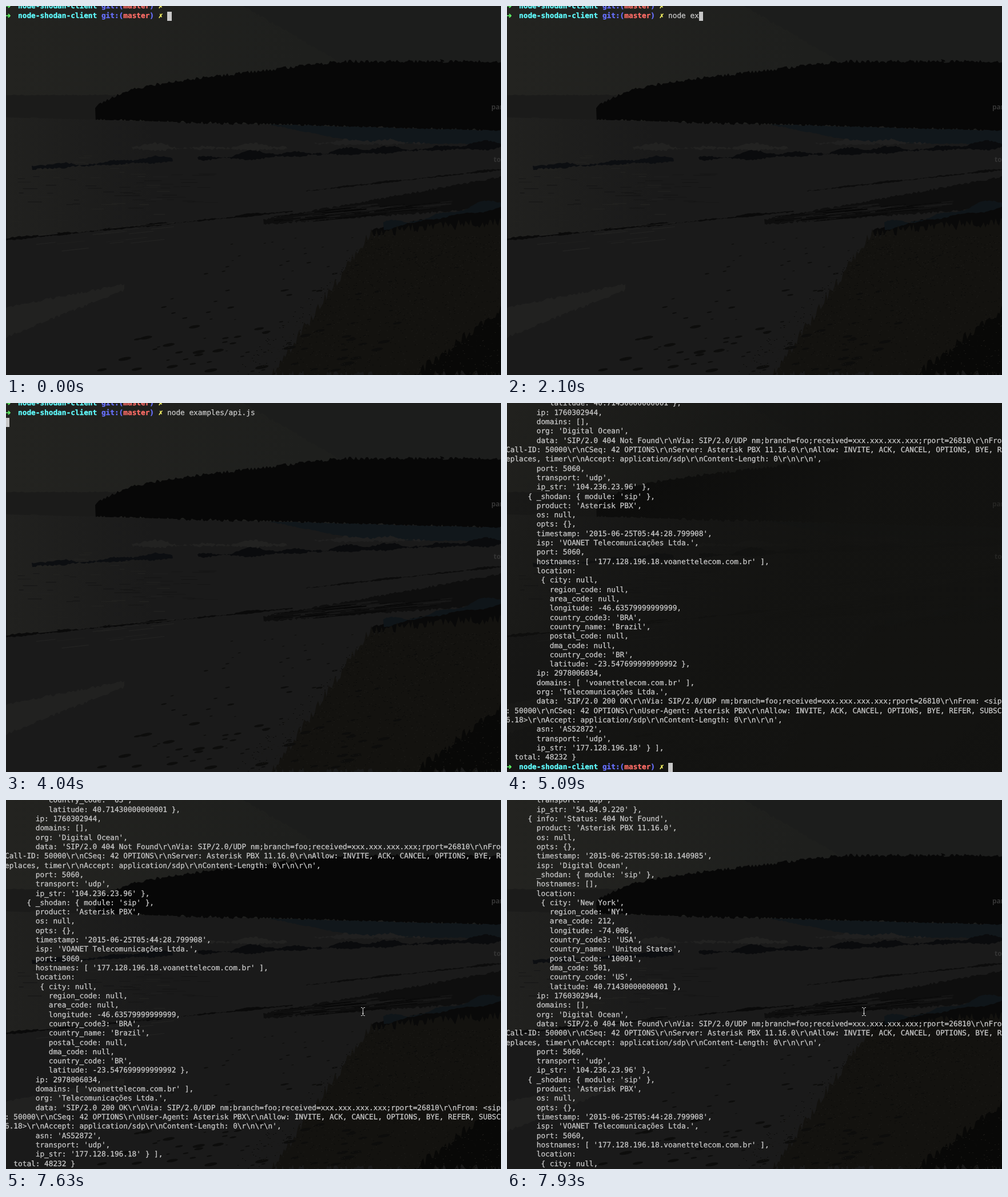
Recreate the animation shown at these times as an HTML page with a canvas. Size 866 px wide and 646 px high, loop 8 s.

```html
<!DOCTYPE html>
<html lang="en">
<head>
<meta charset="utf-8">
<title>Terminal session</title>
<style>
  html, body { margin: 0; width: 100%; height: 100%; overflow: hidden; background: #131311; }
  main { position: relative; width: 100%; height: 100%; overflow: clip; contain: strict; }
  canvas, pre, svg { position: absolute; left: 0; top: 0; }
  pre {
    left: -2px; top: -6.6px; margin: 0; color: #c7c7c7;
    font: 12.75px/16.32px "DejaVu Sans Mono", monospace;
    text-rendering: geometricPrecision; font-variant-ligatures: none;
    -webkit-text-stroke: .3px;
  }
  i, .cursor { display: inline-block; width: .602em; height: 16.32px; vertical-align: top; font-style: normal; }
  .cursor { background: #c7c7c7; }
  .green { color: #5ff967; font-family: "DejaVu Sans", sans-serif; }
  .cyan { color: #60fdff; } .blue { color: #6871ff; }
  .red { color: #ff6d67; } .yellow { color: #fefb67; }
</style>
</head>
<body>
<main>
  <canvas id="beach" width="866" height="646"></canvas>
  <canvas id="dusk" width="866" height="646"></canvas>
  <pre id="screen"></pre>
  <svg id="pointer" width="7" height="15" fill="none" stroke="#d8d8d8">
    <path d="M0 .5H2L3.5 2 5 .5H7M3.5 2V13M0 14.5H2L3.5 13 5 14.5H7M2 10.5H5"/>
  </svg>
</main>
<script>
const output = String.raw`       transport: 'udp',
       ip_str: '54.84.9.220' },
     { info: 'Status: 404 Not Found',
       product: 'Asterisk PBX 11.16.0',
       os: null,
       opts: {},
       timestamp: '2015-06-25T05:50:18.140985',
       isp: 'Digital Ocean',
       _shodan: { module: 'sip' },
       hostnames: [],
       location:
        { city: 'New York',
          region_code: 'NY',
          area_code: 212,
          longitude: -74.006,
          country_code3: 'USA',
          country_name: 'United States',
          postal_code: '10001',
          dma_code: 501,
          country_code: 'US',
          latitude: 40.71430000000001 },
       ip: 1760302944,
       domains: [],
       org: 'Digital Ocean',
       data: 'SIP/2.0 404 Not Found\r\nVia: SIP/2.0/UDP nm;branch=foo;received=xxx.xxx.xxx.xxx;rport=26810\r\nFrom
Call-ID: 50000\r\nCSeq: 42 OPTIONS\r\nServer: Asterisk PBX 11.16.0\r\nAllow: INVITE, ACK, CANCEL, OPTIONS, BYE, RE
eplaces, timer\r\nAccept: application/sdp\r\nContent-Length: 0\r\n\r\n',
       port: 5060,
       transport: 'udp',
       ip_str: '104.236.23.96' },
     { _shodan: { module: 'sip' },
       product: 'Asterisk PBX',
       os: null,
       opts: {},
       timestamp: '2015-06-25T05:44:28.799908',
       isp: 'VOANET Telecomunicações Ltda.',
       port: 5060,
       hostnames: [ '177.128.196.18.voanettelecom.com.br' ],
       location:
        { city: null,
          region_code: null,
          area_code: null,
          longitude: -46.63579999999999,
          country_code3: 'BRA',
          country_name: 'Brazil',
          postal_code: null,
          dma_code: null,
          country_code: 'BR',
          latitude: -23.547699999999992 },
       ip: 2978006034,
       domains: [ 'voanettelecom.com.br' ],
       org: 'Telecomunicações Ltda.',
       data: 'SIP/2.0 200 OK\r\nVia: SIP/2.0/UDP nm;branch=foo;received=xxx.xxx.xxx.xxx;rport=26810\r\nFrom: <sip:
: 50000\r\nCSeq: 42 OPTIONS\r\nUser-Agent: Asterisk PBX\r\nAllow: INVITE, ACK, CANCEL, OPTIONS, BYE, REFER, SUBSCR
6.18>\r\nAccept: application/sdp\r\nContent-Length: 0\r\n\r\n',
       asn: 'AS52872',
       transport: 'udp',
       ip_str: '177.128.196.18' } ],
  total: 48232 }`.replace(/</g, '&lt;').split('\n');

const prompt = '<b><i class="green">➜</i>  <span class="cyan">node-shodan-client</span> ' +
  '<span class="blue">git:(<span class="red">master</span>)</span> <i class="yellow">✗</i></b> ';
const cursor = '<span class="cursor"></span>';

// What appears on each keyboard beat; longer pieces are tab completions.
const keys = 'n||o|d|e| e||x|amples/|||a|p|i.js '.split('|');

const LOOP = 8000, TYPE = 1050, BEAT = 149.2, ENTER = 4040, OUTPUT = 5090;
const POINT = 7180, SCROLL = 7630, STEP = 150, SCROLL_ROWS = 20, SCROLL_STEPS = 3;
const stepsSince = (start, t, length) => Math.floor((t - start) / length) + 1;

const $ = id => document.getElementById(id);
const W = 866, H = 646;
let ctx, seed;
const random = () => (seed = seed * 16807 % 2147483647) / 2147483647;

function across(from, to, x) {
  const gradient = ctx.createLinearGradient(0, 0, x, 0);
  gradient.addColorStop(0, from);
  gradient.addColorStop(1, to);
  return gradient;
}

// Fills between two curves y = top(x) and y = bottom(x) with ragged edges.
function band(color, x0, x1, top, bottom, rough = 2) {
  const jitter = () => (random() - .5) * rough;
  ctx.beginPath();
  for (let x = x0; x <= x1 + 2; x += 3) ctx.lineTo(x, top(x) + jitter());
  for (let x = x1 + 2; x >= x0; x -= 3) ctx.lineTo(x, bottom(x) + jitter());
  ctx.fillStyle = color;
  ctx.fill();
}

// A band that swells and thins around one curve.
function wave(color, x0, x1, middle, thick, rough = 2) {
  const half = x => thick * (.4 + .3 * Math.sin(x / 31) + .3 * Math.sin(x / 13));
  band(color, x0, x1, x => middle(x) - half(x), x => middle(x) + half(x) / 2, rough);
}

function streaks(color, count, x, y, w, h, slope, length) {
  ctx.strokeStyle = color;
  for (let i = 0; i < count; i++) {
    const sx = x + random() * w, sy = y + random() * h + (sx - x) * slope;
    const run = length * (.3 + random());
    ctx.lineWidth = .6 + random();
    ctx.beginPath();
    ctx.moveTo(sx, sy);
    ctx.lineTo(sx + run, sy + run * slope);
    ctx.stroke();
  }
}

// Straight line starting at (x0, y0).
const slope = (x0, y0, rise) => x => y0 + rise * (x - x0);
const floor = () => H;
const ridge = x => Math.max(97, 143 - .12 * (x - 200) + 32 * Math.exp((155 - x) / 40));
const coast = slope(0, 195, .027);
const surf = slope(0, 286, -.047);
const shore = slope(0, 409, -.098);

function paintSky() {
  band(across('#232320', '#1e1f1d', 520), 0, W, () => -9, coast, 0);
  band('#1c1d1c', 415, W, () => -9, x => Math.min(130, .58 * (x - 415)), 5);
  band('#1b1b1a', 0, 190, () => 156, coast);
  band('#070707', 156, W, ridge, coast, 6);
  band('#070707', 759, 765, () => 94, ridge);
}

function paintSea() {
  band(across('#21211f', '#1a1a1a', 260), 0, 300, coast, shore, 0);
  band('#11171b', 460, W, coast, x => Math.min(241, coast(460) + .2 * (x - 460)));
  wave('#222221', 220, 490, () => 249, 9, 4);
  wave('#202020', 540, 730, () => 240, 8, 4);
  wave('#0c0e11', 45, 290, slope(45, 284, -.06), 9, 3);
  wave('#0a0b0d', 335, W, slope(335, 268, -.042), 11, 3);
  streaks('#161616', 50, 20, 294, 330, 60, 0, 24);
  streaks('#222220', 35, 0, 262, 300, 120, 0, 25);
}

function paintSand() {
  const wetTop = slope(450, 374, -.18), puddle = slope(690, 382, -.19);
  band('#0e0e0e', 450, W, wetTop, slope(450, 382, -.07), 4);
  streaks('#1a1a1a', 40, 470, 364, 260, 18, -.1, 65);
  streaks('#080808', 30, 450, 368, 260, 18, -.1, 60);
  band('#090909', 640, W, puddle, () => 402, 4);
  wave('#0f1519', 660, W, puddle, 13);
  wave('#0a0a0a', 0, 500, shore, 4);
  wave('#0c0c0c', 525, W, slope(525, 324, -.11), 3);
  streaks('#222221', 18, 30, 402, 250, 35, -.11, 50);
  band('#212120', 0, 205, slope(0, 528, -.2), slope(0, 580, -.4), 5);
  band('#13120f', 465, W, x => Math.max(398 - .1 * (x - 640), 646 - 1.44 * (x - 465)), floor, 20);
  band('#080807', 715, W, slope(715, 646, -.77), floor, 20);
}

// Footprints grow with nearness; grains gather towards the lower right.
function paintSpecks() {
  for (let i = 0; i < 120; i++) {
    const near = random(), size = 2 + 12 * near * random();
    const x = 400 + 450 * random() - 240 * near, y = 405 + 235 * near;
    ctx.beginPath();
    ctx.ellipse(x, y, size, size / 4, -.18, 0, 7);
    ctx.fillStyle = '#0d0d0c';
    ctx.fill();
  }
  for (let i = 0; i < 1500; i++) {
    const y = 400 + 246 * random(), x = W - (W - 1040 + y) * random();
    ctx.fillStyle = i % 2 ? '#0b0b0a' : '#191815';
    ctx.fillRect(x | 0, y | 0, 2, 1);
  }
}

function paintLabels(color) {
  ctx.fillStyle = color;
  ctx.font = 'bold 12px "Open Sans", sans-serif';
  ctx.fillText('par', 849, 181);
  ctx.fillText('to', 853, 273);
}

function paintScene(id) {
  ctx = $(id).getContext('2d');
  seed = 71;
  ctx.fillStyle = '#1a1a1a';
  ctx.fillRect(0, 0, W, H);
  paintSky();
  paintSea();
  paintSand();
  paintSpecks();
}

function paintVeil() {
  const veil = ctx.createLinearGradient(0, 0, 457, 366);
  veil.addColorStop(0, 'rgba(19, 19, 17, .1)');
  veil.addColorStop(1, 'rgba(19, 19, 17, .95)');
  ctx.fillStyle = veil;
  ctx.fillRect(0, 0, W, H);
}

function screenAt(t) {
  if (t >= OUTPUT) {
    const progress = Math.max(0, stepsSince(SCROLL, t, STEP)) / SCROLL_STEPS;
    const top = SCROLL_ROWS - Math.round(SCROLL_ROWS * progress ** 3);
    return [...output, prompt + cursor].slice(top, top + 40).join('\n');
  }
  const typed = keys.slice(0, Math.max(0, stepsSince(TYPE, t, BEAT))).join('');
  return prompt + '\n' + prompt + typed + (t < ENTER ? '' : '\n') + cursor;
}

// The pointer darts left and settles with a small overshoot.
function placePointer(t) {
  const step = stepsSince(POINT, t, STEP) - 1;
  const x = Math.round(621 + 195 * .015 ** step);
  const y = Math.round(363 + 7 * (-.26) ** step);
  $('pointer').style.display = step < 0 ? 'none' : 'block';
  $('pointer').style.transform = `translate(${x}px, ${y}px)`;
}

let shown;
function frame(now) {
  const t = now % LOOP;
  const text = screenAt(t);
  if (text !== shown) $('screen').innerHTML = shown = text;
  $('dusk').style.display = t >= OUTPUT && t < SCROLL ? 'block' : 'none';
  placePointer(t);
  requestAnimationFrame(frame);
}

paintScene('beach');
paintLabels('#343434');
paintScene('dusk');
paintVeil();
paintLabels('#252523');
frame(performance.now());
</script>
</body>
</html>
```
